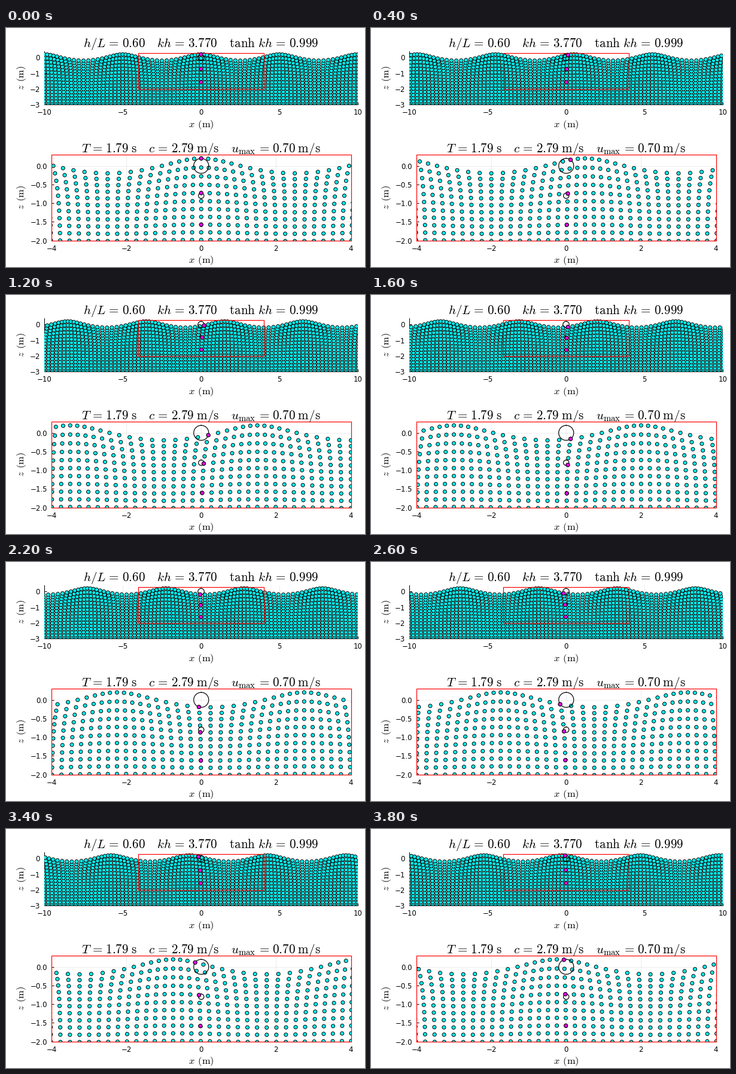
A matplotlib script for the animation above (4 s loop, 600x400 px).

```python
import numpy as np
import matplotlib.pyplot as plt
from matplotlib.animation import FuncAnimation

W, H, DPI = 600, 400, 100
FRAMES, LOOP = 20, 4000
PX = 72 / DPI  # points per pixel

plt.rcParams.update({
    "font.family": "DejaVu Sans",
    "mathtext.fontset": "cm",
    "axes.spines.top": False,
    "axes.spines.right": False,
})

# Linear wave in water of finite depth
AMP, DEPTH, LENGTH = 0.2, 3.0, 5.0
K = 2 * np.pi / LENGTH
MARKED_Z = np.array([0, -0.8, -1.6])
VIEW = (-4, 4, -2, 0.3)


def orbit(x0, z0, phase):
    """Position of the water particle whose mean place is (x0, z0)."""
    theta = K * x0 - phase
    s = K * (z0 + DEPTH)
    scale = AMP / np.sinh(K * DEPTH)
    x = x0 - scale * np.cosh(s) * np.sin(theta)
    z = z0 + scale * np.sinh(s) * np.cos(theta)
    return x, z


grid_x, grid_z = (g.ravel() for g in np.meshgrid(
    np.linspace(-10, 10, 81), np.linspace(-3, 0, 16)))

fig = plt.figure(figsize=(W / DPI, H / DPI), dpi=DPI, facecolor="white")


def label(x, y, text, size, **kw):
    fig.text(x / W, 1 - y / H, text, fontsize=size * PX, ha="center", **kw)


def dots(ax, x, z, color, zorder):
    return ax.scatter(x, z, s=(6 * PX) ** 2, c=[color] * len(x),
                      edgecolors="black", linewidths=PX, zorder=zorder)


def panel(box, limits, xticks, zticks):
    left, top, right, bottom = box
    ax = fig.add_axes([left / W, 1 - bottom / H,
                       (right - left) / W, (bottom - top) / H])
    ax.set(xlim=limits[:2], ylim=limits[2:], xticks=xticks, yticks=zticks)
    ax.set_axisbelow(True)
    ax.grid(color="black", alpha=0.1, linewidth=0.5)
    ax.tick_params(direction="in", length=4 * PX, width=PX,
                   pad=7 * PX, labelsize=11.8 * PX)
    for spine in ax.spines.values():
        spine.set(linewidth=PX, zorder=1)

    x1, x2, z1, z2 = VIEW
    ax.plot([x1, x2, x2, x1, x1], [z1, z1, z2, z2, z1], color="red",
            lw=1.2 * PX, zorder=3, clip_on=False)
    turn = np.linspace(0, 2 * np.pi, 100)
    for z0 in MARKED_Z:
        ax.plot(*orbit(0, z0, turn), color="black", lw=1.2 * PX, zorder=4)

    water = dots(ax, grid_x, grid_z, "cyan", 2)
    marked = dots(ax, 0 * MARKED_Z, MARKED_Z, "magenta", 5)
    return water, marked


panels = [
    panel((64, 39, 588, 128), (-10, 10, -3, 0.4),
          range(-10, 11, 5), range(-3, 1)),
    panel((76, 212, 576.5, 355.7), VIEW,
          range(-4, 5, 2), np.arange(-2, 0.1, 0.5)),
]

EQ = r"\hspace{0.12}=\hspace{0.12}"
GAP = r"\hspace{1.14}"
UNIT = r"\hspace{0.28}\mathrm"
label(325.7, 32.3, rf"$h/L{EQ}0.60{GAP}kh{EQ}3.770{GAP}\tanh\,kh{EQ}0.999$",
      21.1, va="baseline")
label(325.7, 208.3,
      rf"$T{EQ}1.79{UNIT}{{s}}{GAP}c{EQ}2.79{UNIT}{{m/s}}{GAP}"
      rf"u_{{\mathrm{{max}}}}{EQ}0.70{UNIT}{{m/s}}$",
      21.1, va="baseline")
for y in (165.5, 393):
    label(326, y, r"$x\hspace{0.45}\mathrm{(m)}$", 16.4, va="baseline")
for y in (84, 284):
    label(26, y, r"$z\hspace{0.45}\mathrm{(m)}$", 16.4, va="center",
          rotation=90)


def update(i):
    phase = 2 * np.pi * i / FRAMES
    water_pos = np.column_stack(orbit(grid_x, grid_z, phase))
    marked_pos = np.column_stack(orbit(0 * MARKED_Z, MARKED_Z, phase))
    for water, marked in panels:
        water.set_offsets(water_pos)
        marked.set_offsets(marked_pos)
    return [artist for pair in panels for artist in pair]


anim = FuncAnimation(fig, update, frames=FRAMES, interval=LOOP / FRAMES,
                     repeat=True, repeat_delay=0)
plt.show()
```
